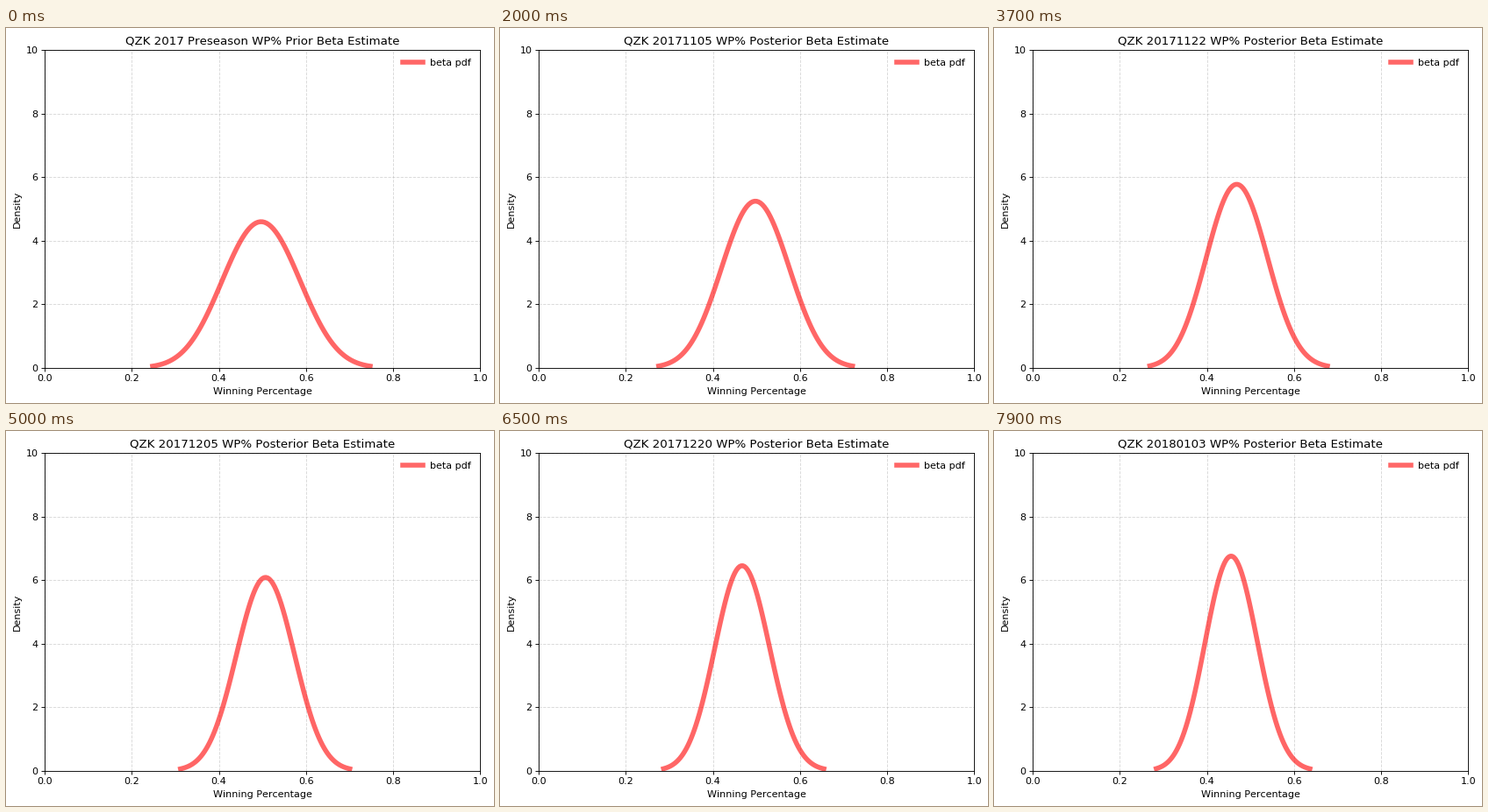
Write a matplotlib script that moves like this. It is 556 px wide and 428 px high and loops after 8 s.

```python
from math import lgamma

import numpy as np
import matplotlib.pyplot as plt
from matplotlib.animation import FuncAnimation

W, H, DPI = 556, 428, 80
FRAMES, INTERVAL = 80, 100
TEAM = "QZK"
START = np.datetime64("2017-10-16")

PRIOR_A, PRIOR_B = 16.75, 16.95
GRID = np.linspace(0.001, 0.999, 4001)

# Games played by a given day, and alternating winning and losing streaks
PACE = np.array([(0, 0), (26, 13), (37, 19), (50, 25), (65, 32), (72, 36), (79, 38)])
STREAKS = [1, 1, 1, 2, 3, 4, 1, 3, 1, 1, 6, 4, 1, 3, 1, 3, 1, 1]
WON = np.repeat(np.arange(len(STREAKS)) % 2 == 0, STREAKS)


def record(day):
    games = int(np.interp(day, *PACE.T) + 0.2)
    wins = WON[:games].sum()
    return wins, games - wins


def beta_pdf(x, a, b):
    log_norm = lgamma(a + b) - lgamma(a) - lgamma(b)
    return np.exp(log_norm + (a - 1) * np.log(x) + (b - 1) * np.log1p(-x))


def beta_ppf(q, a, b):
    p = beta_pdf(GRID, a, b)
    cdf = np.concatenate([[0], np.cumsum((p[1:] + p[:-1]) / 2)])
    return np.interp(q, cdf / cdf[-1], GRID)


def curve(day):
    wins, losses = record(day)
    a, b = PRIOR_A + wins, PRIOR_B + losses
    x = np.linspace(*beta_ppf([0.001, 0.999], a, b), 100)
    return x, beta_pdf(x, a, b)


def heading(day):
    if day == 0:
        return f"{TEAM} 2017 Preseason WP% Prior Beta Estimate"
    date = str(START + day).replace("-", "")
    return f"{TEAM} {date} WP% Posterior Beta Estimate"


plt.rcParams.update({"font.family": "DejaVu Sans", "text.kerning_factor": 6})
fig = plt.figure(figsize=(W / DPI, H / DPI), dpi=DPI, facecolor="white")
ax = fig.add_axes([44.2 / W, 40.3 / H, 496 / W, 362.4 / H])
ax.set(xlim=(0, 1), ylim=(0, 10), xlabel="Winning Percentage", ylabel="Density")
ax.grid(linestyle="--", color="#b0b0b0", alpha=0.5)
line, = ax.plot(*curve(0), "r-", lw=5, alpha=0.6, label="beta pdf")
title = ax.set_title(heading(0))
ax.legend(loc="upper right", frameon=False)


def update(day):
    line.set_data(*curve(day))
    title.set_text(heading(day))
    return line, title


anim = FuncAnimation(fig, update, frames=FRAMES, interval=INTERVAL,
                     repeat=True, repeat_delay=0, blit=False)
plt.show()
```
